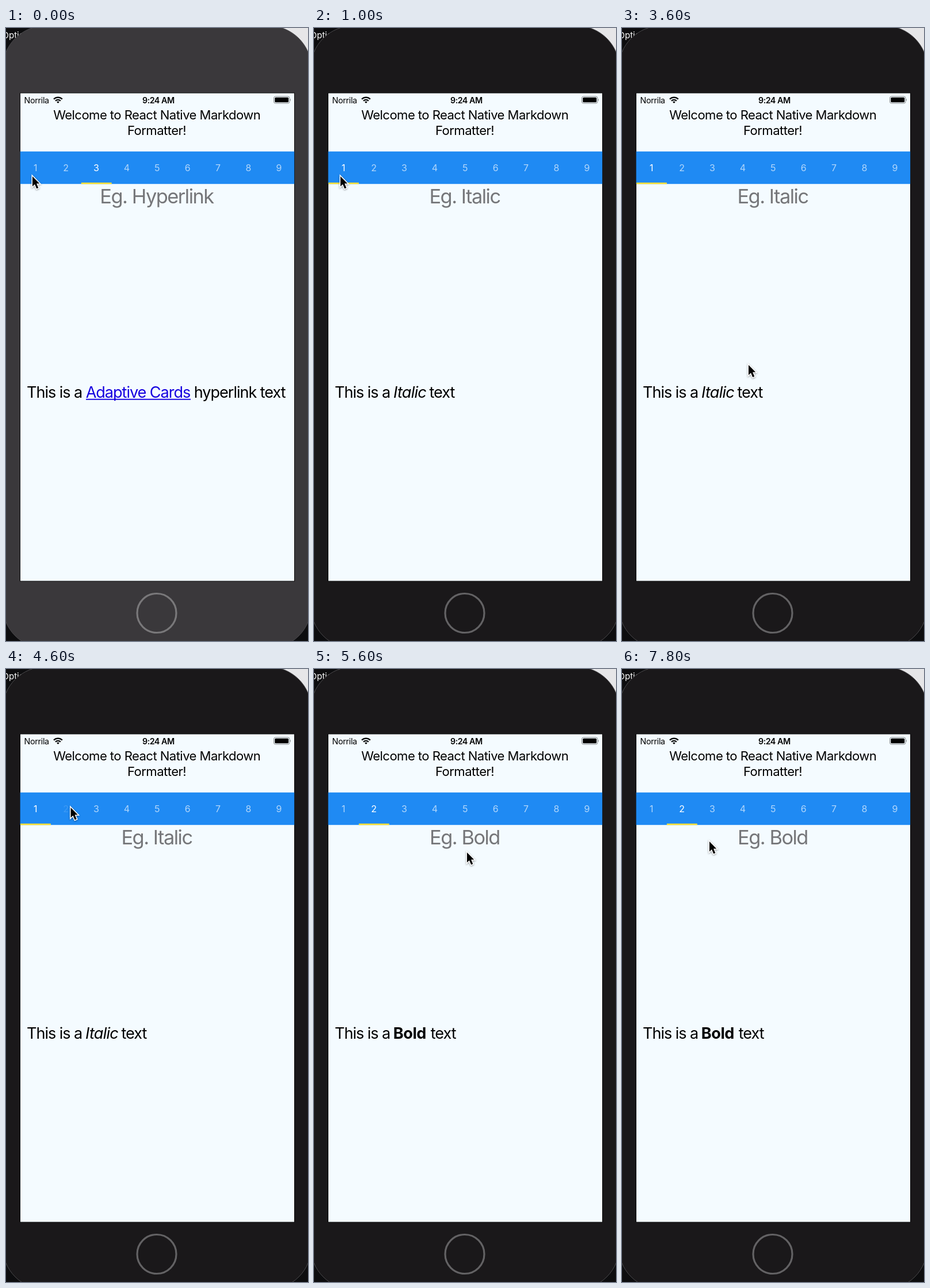
An HTML page for the animation above (8 s loop, 525x1066 px).

```html
<!DOCTYPE html>
<html lang="en">
<head>
<meta charset="utf-8">
<title>Markdown formatter demo</title>
<style>
  html, body { margin: 0; width: 100%; height: 100%; overflow: hidden; background: #0d0d0f; }
  svg { display: block; width: 525px; height: 1066px; }
  text { font-family: Inter, Roboto, sans-serif; font-optical-sizing: none; white-space: pre; }
  .mid { text-anchor: middle; }
  .status { font-size: 14.3px; letter-spacing: -.3px; }
  .clock { font-weight: 600; letter-spacing: -.5px; }
  .title { font-size: 22.1px; letter-spacing: -.56px; }
  .head { font-size: 34.4px; letter-spacing: -1.5px; fill: #757679; }
  .body { font-size: 27.1px; letter-spacing: -1.05px; }
  .tab { font-size: 16px; fill: #fff; }
  .link { fill: #1600e0; }
  .italic { font-style: italic; letter-spacing: -.75px; }
  .bold { font-weight: 700; letter-spacing: -.4px; }
  .cursor { filter: drop-shadow(0 1.5px 1.5px rgba(0, 0, 0, .4)); }
</style>
</head>
<body>
<svg viewBox="0 0 525 1066">
  <defs>
    <clipPath id="screen"><rect x="25" y="271" width="476" height="690"/></clipPath>
  </defs>

  <!-- desktop behind the phone -->
  <rect width="525" height="1066" fill="#0d0d0f"/>
  <rect x="440" width="85" height="90" fill="#e6e6e8"/>
  <text x="-6.5" y="18" font-size="15" fill="#fff">Option</text>

  <rect id="phone" x="-6" y="-4" width="537" height="1083" rx="75" stroke="#4a494c"/>
  <circle id="home" cx="262" cy="1017.5" r="34" fill="none" stroke-width="3.2"/>
  <rect x="24.5" y="113" width="477" height="849" fill="#f4fbff" stroke="#0c0c0d"/>

  <!-- status bar -->
  <text class="status" x="31.5" y="130.5">Norrila</text>
  <g fill="none" stroke="#000" stroke-width="2.3">
    <path d="M83 123.6a10.6 10.6 0 0 1 14.8 0M86 126.7a6.2 6.2 0 0 1 8.8 0"/>
    <path d="M90.4 131l-2.3-2.4a3.3 3.3 0 0 1 4.6 0z" fill="#000" stroke="none"/>
  </g>
  <text class="status clock mid" x="264.8" y="130.5">9:24 AM</text>
  <rect x="465.5" y="119" width="27.5" height="12" rx="3" fill="none" stroke="#85898c"/>
  <rect x="467.3" y="120.7" width="23.9" height="8.6" rx="1.6"/>
  <path d="M494 123q2 2 0 4z" fill="#85898c"/>

  <text class="title mid" x="262.2" y="159">Welcome to React Native Markdown</text>
  <text class="title mid" x="262" y="186">Formatter!</text>

  <rect x="24.6" y="214.7" width="476.6" height="56.5" fill="#1f8af3"/>
  <g id="tabs"></g>
  <rect id="bar" y="268.8" width="52.9" height="2.6" fill="#ffe033"/>

  <g clip-path="url(#screen)">
    <g class="page">
      <text class="head mid" x="262" y="304.5">Eg. Italic</text>
      <text class="body" y="642.5"><tspan x="36">This is a </tspan><tspan class="italic" x="138">Italic</tspan><tspan x="200.5">text</tspan></text>
    </g>
    <g class="page">
      <text class="head mid" x="262" y="304.5">Eg. Bold</text>
      <text class="body" y="642.5"><tspan x="36">This is a </tspan><tspan class="bold" x="137.7">Bold</tspan><tspan x="202.8">text</tspan></text>
    </g>
    <g class="page">
      <text class="head mid" x="262" y="304.5">Eg. Hyperlink</text>
      <text class="body" y="642.5"><tspan x="36">This is a </tspan><tspan class="link" x="138.7">Adaptive Cards</tspan><tspan x="326.8">hyperlink text</tspan></text>
      <rect class="link" x="139" y="644.8" width="182" height="1.9"/>
    </g>
  </g>

  <g class="cursor">
    <path id="cursor" d="M0 0V17.5L4 13.8L7.2 21.2L10.3 19.9L7.1 12.6H12.3Z"
          stroke="#fff" stroke-width="3" paint-order="stroke"/>
  </g>
</svg>
<script>
const LOOP = 8000, STEP = 200, TAB = 52.9, LEFT = 25, WIDTH = 476;
const $ = id => document.getElementById(id);
const pages = [...document.querySelectorAll('.page')];
const clamp = v => Math.min(1, Math.max(0, v));
const smooth = p => p * p * (3 - 2 * p);
const easeOut = p => 1 - (1 - p) ** 3;

// cursor moves: start, end, target x, target y
const home = [46, 258];
const moves = [
  [1000, 1800, 274, 338],
  [1800, 2400, 284, 318],
  [2600, 3200, 220, 586],
  [3600, 4400, 112.5, 241],
  [5000, 5600, 266, 319],
  [6200, 6800, 193, 606],
  [7000, 7800, 152, 300]
];

const tabs = Array.from({ length: 9 }, (_, i) => {
  const t = document.createElementNS('http://www.w3.org/2000/svg', 'text');
  t.setAttribute('class', 'tab mid');
  t.setAttribute('x', LEFT + TAB * (i + .5) - .3);
  t.setAttribute('y', 249);
  t.textContent = i + 1;
  $('tabs').append(t);
  return t;
});

function cursorAt(t) {
  let [x, y] = home;
  for (const [a, b, tx, ty] of moves) {
    const p = smooth(clamp((t - a) / (b - a)));
    x += (tx - x) * p;
    y += (ty - y) * p;
  }
  return [x, y];
}

const pageAt = t => t < 1000 ? 2 : easeOut(clamp((t - 4700) / 400));

function pressedAt(t) {
  if (t >= 800 && t < 1000) return 0;
  return t >= 4600 && t < 4800 ? 1 : -1;
}

function draw(t) {
  const idle = t < 200, pos = pageAt(t), pressed = pressedAt(t);
  $('phone').setAttribute('fill', idle ? '#3a383b' : '#1a181a');
  $('home').setAttribute('stroke', idle ? '#79787a' : '#636264');
  $('bar').setAttribute('x', LEFT + TAB * pos);
  pages.forEach((g, i) => g.setAttribute('transform', `translate(${(i - pos) * WIDTH} 0)`));
  tabs.forEach((d, i) => d.setAttribute('opacity',
    i === pressed ? .13 : i === Math.round(pos) ? 1 : .65));
  $('cursor').setAttribute('transform', `translate(${cursorAt(t)})`);
}

const start = performance.now();
function tick() {
  const t = (performance.now() - start) % LOOP;
  draw(Math.floor(t / STEP) * STEP);
  requestAnimationFrame(tick);
}
tick();
</script>
</body>
</html>
```
